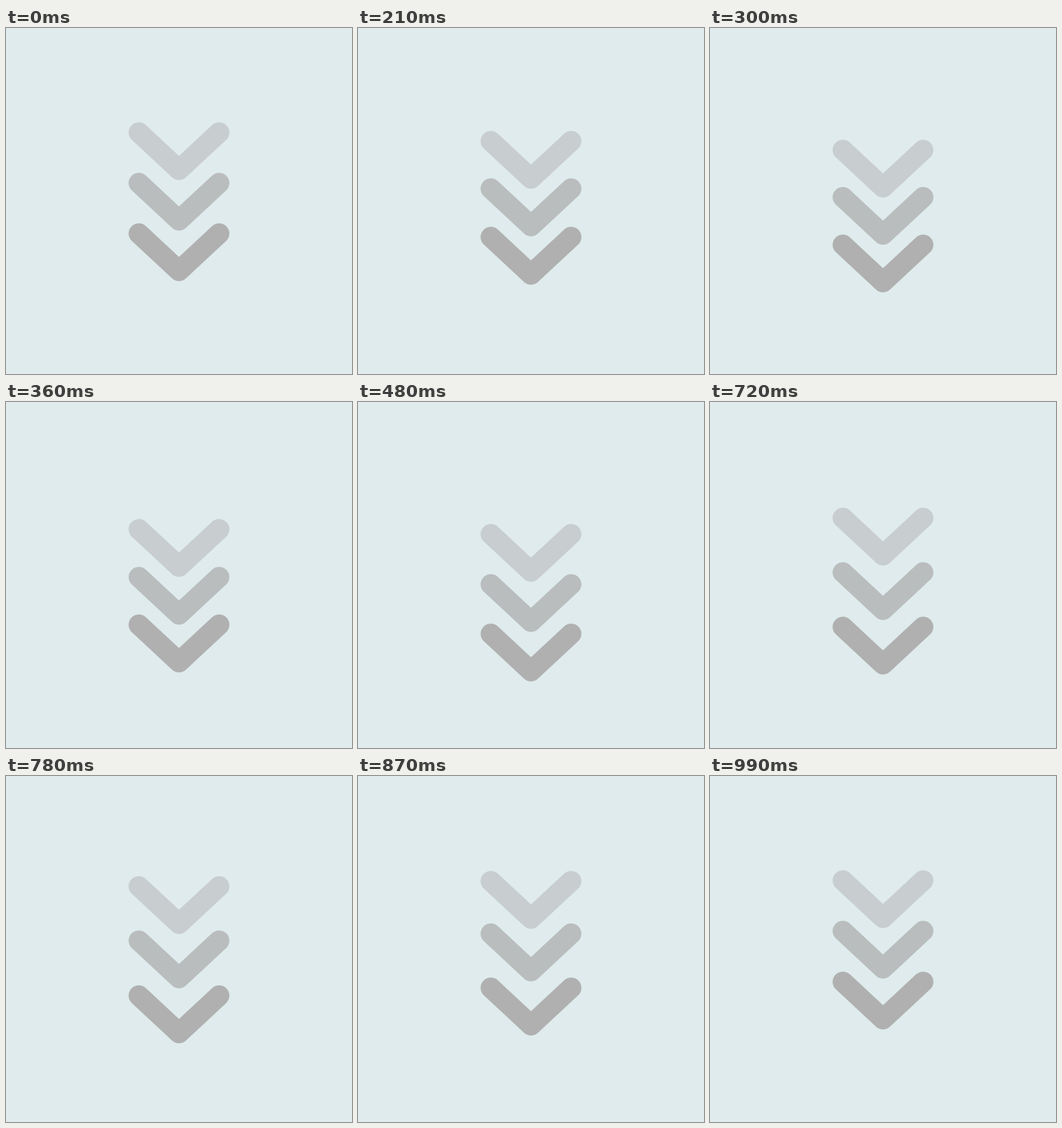
An HTML page for the animation above (1.02 s loop, 500x500 px).

```html
<!DOCTYPE html>
<html lang="en">
<head>
<meta charset="utf-8">
<title>Scroll down</title>
<style>
  html, body { margin: 0; width: 100%; height: 100%; overflow: hidden; background: #dfebec; }
  svg { display: block; width: 100vw; height: 100vh; }
  path { fill: none; stroke-width: 29.6; stroke-linecap: round; stroke-linejoin: round; }
</style>
</head>
<body>
<svg viewBox="0 0 500 500">
  <path stroke="#c8cdd0" d="M192 151L250 205L308 151"/>
  <path stroke="#b9bdbe" d="M192 151L250 205L308 151"/>
  <path stroke="#b0b0b0" d="M192 151L250 205L308 151"/>
</svg>
<script>
  const LOOP = 1020, STEP = 30, HOLD = 90, DROP = 40, GAP = 73;

  // start, lowest point and end of each arrow's dip, in ms
  const dips = [
    [46, 480, 912],
    [82, 511, 961],
    [109, 543, 1022]
  ];
  const arrows = document.querySelectorAll('path');

  const ease = x => (1 - Math.cos(Math.PI * Math.min(1, Math.max(0, x)))) / 2;

  function offset(t, [start, low, end]) {
    if (t < HOLD) return 0;
    return DROP * (t < low ? ease((t - start) / (low - start)) : ease((end - t) / (end - low)));
  }

  function draw(now) {
    const t = Math.floor((now % LOOP) / STEP + 0.001) * STEP;
    arrows.forEach((arrow, i) => {
      const y = i * GAP + offset(t, dips[i]);
      arrow.setAttribute('transform', `translate(0 ${y.toFixed(2)})`);
    });
  }

  let origin = null;
  function tick(now) {
    if (origin === null) origin = now;
    draw(now - origin);
    requestAnimationFrame(tick);
  }
  draw(0);
  requestAnimationFrame(tick);
</script>
</body>
</html>
```
